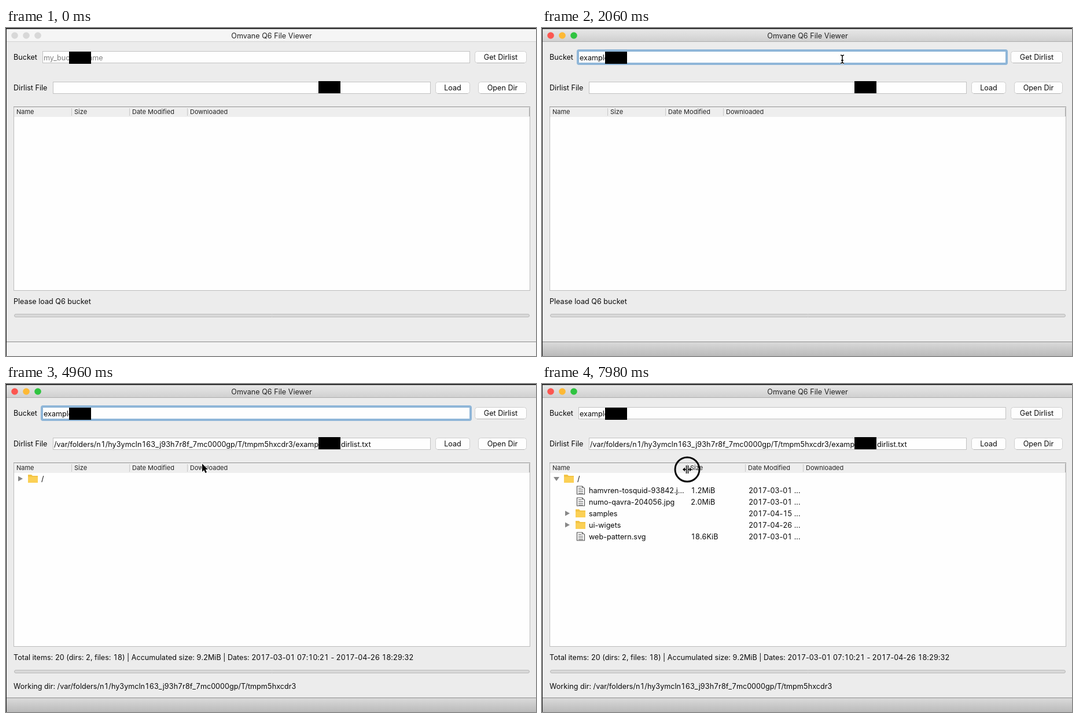
Recreate the animation shown at these times as an HTML page with a canvas. Size 916 px wide and 568 px high, loop 8 s.

```html
<!DOCTYPE html>
<html lang="en">
<head>
<meta charset="utf-8">
<title>File Viewer</title>
<style>
  html, body { margin: 0; width: 100%; height: 100%; overflow: hidden; background: #ececec; }
  canvas { display: block; }
</style>
</head>
<body>
<canvas id="stage" width="916" height="568"></canvas>
<script>
const ctx = document.getElementById('stage').getContext('2d');
const LOOP = 8000, WIDTH = 916, HEIGHT = 568;
const BODY = '#ececec', PAPER = '#fefefe', INK = '#0a0a0a', EDGE = '#c2c2c2';

// Moments at which the interface changes state.
const AT = { focus: 700, type: 1350, typed: 1850, press: 3200, loaded: 4600, expand: 6400, drag: 7300 };
const clicks = [[AT.focus, 820], [AT.press, 3320], [AT.expand, 6520], [AT.drag, LOOP]];

// Pointer path: time, x, y.
const path = [
  [0, 128, 51], [380, 128, 51], [650, 156, 50], [1500, 156, 50], [2060, 519, 54],
  [2850, 850, 51], [3650, 850, 52], [4020, 767, 57], [5500, 155, 173],
  [6000, 155, 173], [6300, 25, 164], [6600, 25, 164], [7180, 112, 151], [7320, 112, 150],
  [7900, 251, 148], [8000, 251, 148]
];

const items = [
  { name: 'hamvren-tosquid-93842.jpg', size: '1.2MiB', date: '2017-03-01 ...' },
  { name: 'numo-qavra-204056.jpg', size: '2.0MiB', date: '2017-03-01 ...' },
  { name: 'samples', date: '2017-04-15 ...', folder: true },
  { name: 'ui-wigets', date: '2017-04-26 ...', folder: true },
  { name: 'web-pattern.svg', size: '18.6KiB', date: '2017-03-01 ...' }
];

function pointerAt(t) {
  const i = path.findIndex((p, k) => k > 0 && t <= p[0]);
  const [t0, x0, y0] = path[i - 1], [t1, x1, y1] = path[i];
  const u = (t - t0) / (t1 - t0), e = u * u * (3 - 2 * u);
  return { x: x0 + (x1 - x0) * e, y: y0 + (y1 - y0) * e };
}

function rect(x, y, w, h, color) {
  ctx.fillStyle = color;
  ctx.fillRect(x, y, w, h);
}

function gradient(y, h, top, bottom) {
  const g = ctx.createLinearGradient(0, y, 0, y + h);
  g.addColorStop(0, top);
  g.addColorStop(1, bottom);
  return g;
}

function rounded(x, y, w, h, r, fill, stroke, line = 1) {
  ctx.beginPath();
  ctx.roundRect(x, y, w, h, r);
  if (fill) { ctx.fillStyle = fill; ctx.fill(); }
  if (stroke) { ctx.strokeStyle = stroke; ctx.lineWidth = line; ctx.stroke(); }
}

function polygon(points, fill, stroke) {
  ctx.beginPath();
  points.forEach(([x, y]) => ctx.lineTo(x, y));
  ctx.closePath();
  if (stroke) { ctx.strokeStyle = stroke; ctx.lineWidth = 2; ctx.stroke(); }
  ctx.fillStyle = fill;
  ctx.fill();
}

function setFont(size) {
  ctx.font = `${size}px Inter, Roboto, sans-serif`;
}

// Splits text into runs; digits are tabular, each as wide as a zero.
function layout(str) {
  const cell = ctx.measureText('0').width;
  let width = 0;
  const runs = (str.match(/\d|\D+/g) || []).map(run => {
    const own = ctx.measureText(run).width, digit = /\d/.test(run);
    const x = width + (digit ? (cell - own) / 2 : 0);
    width += digit ? cell : own;
    return { run, x };
  });
  return { runs, width };
}

function text(str, x, y, { color = INK, size = 12.6, centered = false } = {}) {
  setFont(size);
  ctx.fillStyle = color;
  const { runs, width } = layout(str);
  const left = centered ? x - width / 2 : x;
  runs.forEach(r => ctx.fillText(r.run, left + r.x, y));
}

function elide(str, room) {
  setFont(12.6);
  if (layout(str).width <= room) return str;
  let n = str.length;
  while (n > 2 && layout(str.slice(0, n) + '...').width > room) n--;
  return str.slice(0, n) + '...';
}

function button(label, x, y, w, active) {
  rounded(x + .5, y + .5, w - 1, 20, 4,
    active ? gradient(y, 20, '#4a94de', '#1b60b0') : PAPER, active ? '#2464a8' : '#cfcfcf');
  if (!active) rect(x + 4, y + 20, w - 8, 1, '#b4b4b4');
  text(label, x + w / 2, y + 15, { color: active ? '#fff' : INK, centered: true });
}

function field(x, y, w, focused) {
  rect(x, y, w, 21, PAPER);
  ctx.lineWidth = 1;
  ctx.strokeStyle = EDGE;
  ctx.strokeRect(x + .5, y + .5, w - 1, 20);
  if (focused) rounded(x - 1, y - 1, w + 2, 23, 2, null, '#8fb6d8', 4);
}

function drawWindow(active) {
  rect(0, 0, WIDTH, HEIGHT, BODY);
  rect(0, 1, WIDTH, 22, active ? gradient(1, 22, '#e8e8e8', '#d0d0d0') : '#f5f5f5');
  rect(0, 23, WIDTH, 1, active ? '#adadad' : '#d2d2d2');
  rect(0, 544, WIDTH, 24, active ? gradient(544, 24, '#dadada', '#bababa') : '#f3f3f3');
  rect(0, 543, WIDTH, 1, '#8a8a8a');
  rect(0, 0, WIDTH, 1, '#171717');
  rect(0, 1, WIDTH, 1, '#555');
  rect(0, 0, 1, HEIGHT, '#171717');
  ['#fc5650', '#fdb935', '#2fc440'].forEach((color, i) => {
    ctx.beginPath();
    ctx.arc(15 + 20 * i, 13, 5.8, 0, 7);
    ctx.fillStyle = active ? color : '#d8d8d8';
    ctx.fill();
  });
  text('Omvane Q6 File Viewer', 459, 18, { centered: true, color: '#222' });
}

function drawForm(t) {
  const focused = t >= AT.focus && t < AT.expand;
  const typed = 'example-bucket'.slice(0, Math.max(0, Math.ceil(14 * (t - AT.type) / (AT.typed - AT.type))));
  const hasText = t >= AT.type;
  text('Bucket', 13, 55);
  field(63, 40, 739, focused);
  ctx.save();
  ctx.beginPath();
  ctx.rect(64, 41, hasText ? 60 : 730, 20);
  ctx.clip();
  text(hasText ? typed : 'my_bucket_name', 65, 56, { color: hasText ? INK : '#808080' });
  ctx.restore();
  if (focused && !hasText) rect(65, 43, 1, 16, INK);
  button('Get Dirlist', 810, 40, 90, t >= AT.press && t < AT.loaded);

  text('Dirlist File', 13, 108);
  field(81, 93, 653);
  button('Load', 742, 93, 60);
  button('Open Dir', 816, 93, 84);

  const dir = '/var/folders/n1/hy3ymcln163_j93h7r8f_7mc0000gp/T/tmpm5hxcdr3';
  if (t >= AT.loaded) {
    text(dir + '/example', 83, 109);
    text('dirlist.txt', 579, 109);
    text('Total items: 20 (dirs: 2, files: 18) | Accumulated size: 9.2MiB | Dates: 2017-03-01 07:10:21 - 2017-04-26 18:29:32', 13, 478);
    text('Working dir: ' + dir, 13, 528);
  } else {
    text('Please load Q6 bucket', 13, 478);
  }
  rounded(14.5, 495.5, 890, 5, 2.5, '#d9d9d9', '#bababa');
}

function drawFolder(x, y) {
  polygon([[x, y - 7], [x + 6, y - 7], [x + 8, y - 5], [x + 17, y - 5], [x + 17, y + 7], [x, y + 7]], '#f3c444');
  rect(x, y - 3, 17, 10, '#fbd055');
}

function drawFile(x, y) {
  ctx.lineWidth = 1.2;
  ctx.strokeStyle = '#555';
  ctx.fillStyle = '#fff';
  ctx.beginPath();
  [[0, -7], [9, -7], [13, -3], [13, 7], [0, 7]].forEach(([dx, dy]) => ctx.lineTo(x + dx + .5, y + dy));
  ctx.closePath();
  ctx.fill();
  ctx.stroke();
  for (let i = 0; i < 4; i++) rect(x + 3, y - 4 + 3 * i, i ? 8 : 5, 1, '#555');
  rect(x + 9, y - 7, 1, 4, '#555');
}

function drawTwisty(x, y, open) {
  polygon(open ? [[x - 5, y - 3], [x + 5, y - 3], [x, y + 4]] : [[x - 4, y - 4.5], [x + 4, y], [x - 4, y + 4.5]], '#878787');
}

function drawTable(t, split) {
  rect(13, 136, 893, 319, PAPER);
  rect(14, 137, 891, 17, '#eeeeee');
  ctx.lineWidth = 1;
  ctx.strokeStyle = '#bcbcbc';
  ctx.strokeRect(13.5, 136.5, 892, 318);
  rect(13, 136, 893, 1, '#929292');
  ['Name', 'Size', 'Date Modified', 'Downloaded'].forEach((label, i) => {
    const x = i ? split + 100 * (i - 1) : 13;
    if (i) rect(x, 139, 1, 13, '#c8c8c8');
    text(label, x + 5, 149, { size: 11, color: '#222' });
  });
  rect(904, 138, 1, 15, '#aaa');
  if (t < AT.loaded) return;

  const open = t >= AT.expand;
  drawTwisty(25, 164, open);
  drawFolder(38, 164);
  text('/', 61, 169);
  if (!open) return;
  items.forEach((item, i) => {
    const y = 184 + 20 * i;
    if (item.folder) {
      drawTwisty(44, y, false);
      drawFolder(58, y);
    } else {
      drawFile(60, y);
    }
    text(elide(item.name, split - 84), 81, y + 5);
    text(item.size || '', split + 6, y + 5);
    text(item.date, split + 106, y + 5);
  });
}

// Strokes a path twice so that it gets a light outline.
function outlined(trace) {
  for (const [color, width] of [['#fff', 3.5], ['#000', 1.5]]) {
    ctx.strokeStyle = color;
    ctx.lineWidth = width;
    ctx.beginPath();
    trace();
    ctx.stroke();
  }
}

function drawPointer(t, { x, y }) {
  if (clicks.some(([from, to]) => t >= from && t < to)) {
    ctx.beginPath();
    ctx.arc(x, y, 21, 0, 7);
    ctx.strokeStyle = '#0a0a0a';
    ctx.lineWidth = 3;
    ctx.stroke();
  }
  ctx.save();
  ctx.translate(Math.round(x), Math.round(y));
  if (t < AT.press && x < 803) {
    outlined(() => {
      for (const s of [-1, 1]) {
        ctx.moveTo(-3, 7 * s);
        ctx.quadraticCurveTo(0, 7 * s, 0, 5 * s);
        ctx.quadraticCurveTo(0, 7 * s, 3, 7 * s);
      }
      ctx.moveTo(0, -6);
      ctx.lineTo(0, 6);
      ctx.moveTo(-2, 2);
      ctx.lineTo(2, 2);
    });
  } else if (t >= 6900 && x > 90) {
    outlined(() => {
      for (const s of [-1, 1]) {
        ctx.moveTo(1.5 * s, -7);
        ctx.lineTo(1.5 * s, 7);
        ctx.moveTo(1.5 * s, 0);
        ctx.lineTo(6 * s, 0);
      }
    });
    for (const s of [-1, 1]) polygon([[4 * s, -3.5], [8 * s, 0], [4 * s, 3.5]], '#000');
  } else {
    polygon([[0, 0], [0, 14], [3.2, 11], [5.5, 16], [8, 15], [5.8, 10], [10, 10]], '#000', '#fff');
  }
  ctx.restore();
}

function draw(now) {
  const t = now % LOOP, pointer = pointerAt(t);
  drawWindow(t >= AT.focus);
  drawForm(t);
  drawTable(t, t < AT.drag ? 113 : Math.max(113, Math.round(pointer.x)));
  drawPointer(t, pointer);
  rect(109, 41, 38, 21, '#000');
  rect(540, 92, 38, 21, '#000');
  requestAnimationFrame(draw);
}
requestAnimationFrame(draw);
</script>
</body>
</html>
```
